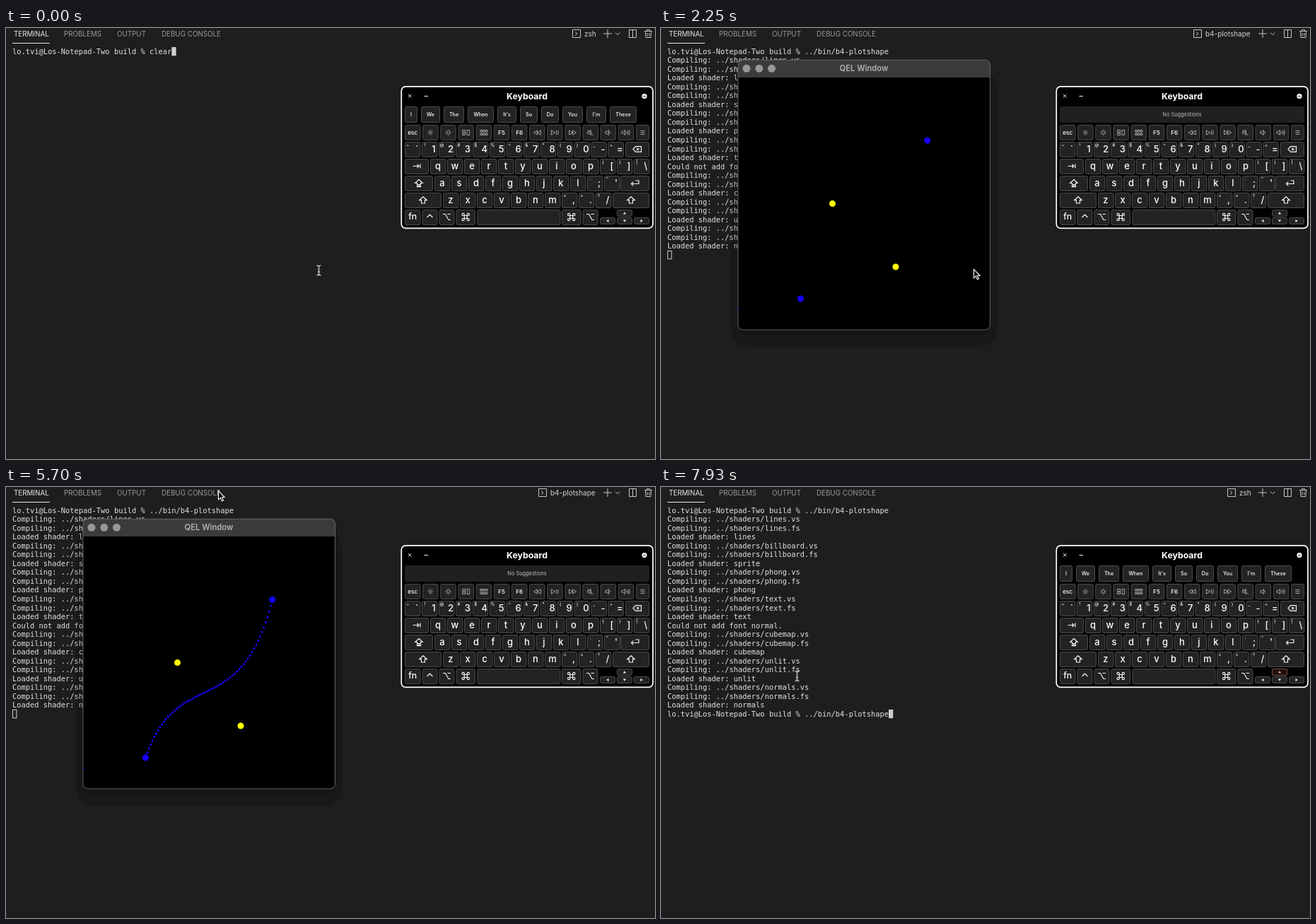
These frames come from a looping animation (918x610 px, 8 s). An HTML page:

```html
<!DOCTYPE html>
<html lang="en">
<head>
<meta charset="utf-8">
<title>Curve demo</title>
<style>
html, body { margin: 0; width: 100%; height: 100%; overflow: hidden; background: #1e1e1e; }
svg { display: block; width: 918px; height: 610px; font-family: Inter, "Open Sans", sans-serif; }
.mono { font: 10.4px "DejaVu Sans Mono", "Liberation Mono", monospace; fill: #e2e2e2; }
.tab { font-size: 9.8px; fill: #989898; }
.tab.active { fill: #e7e7e7; }
.label { font-size: 10px; fill: #d0d0d0; }
.tool { fill: none; stroke: #c5c5c5; }
.key { fill: #232323; stroke: #4c4c4c; }
.cap { fill: #fff; font-weight: 500; text-anchor: middle; }
.icon { fill: none; stroke: #f4f4f4; stroke-width: 1.2; }
.thin { stroke: #c4c4c4; stroke-width: .8; }
.solid { fill: #e8e8e8; stroke: none; }
.block { fill: #cfcfcf; }
</style>
</head>
<body>
<svg id="stage" viewBox="0 0 918 610">
  <g id="panel">
    <text class="tab active" x="11" y="11.6">TERMINAL</text>
    <text class="tab" x="82" y="11.6">PROBLEMS</text>
    <text class="tab" x="157" y="11.6">OUTPUT</text>
    <text class="tab" x="220" y="11.6">DEBUG CONSOLE</text>
    <path d="M9 21.5H62" stroke="#e7e7e7"/>
    <g id="shellTab">
      <path class="tool" d="M801.5 2.5h11v11h-11zM805 5.5l3 2.5l-3 2.5"/>
      <text class="label" x="818" y="11.8">zsh</text>
    </g>
    <g id="appTab">
      <path class="tool" d="M753.5 2.5h11v11h-11zM757 5.5l3 2.5l-3 2.5"/>
      <text class="label" x="770" y="11.8">b4-plotshape</text>
    </g>
    <path class="tool" d="M845 8H857M851 2V14M862 6.5l3.2 3.2l3.2-3.2M881.5 2.5h10v11h-10zM886.5 2.5v11"/>
    <path class="tool" d="M903 4.5h11M906.5 4.5v-2h4v2M904.5 4.5l.5 9h7l.5-9M907 7v4.5M910 7v4.5"/>
  </g>

  <g id="term" class="mono"></g>

  <g id="win">
    <rect id="shadow" x="99" y="58" width="376" height="394" rx="26" fill="#000" fill-opacity=".17"/>
    <rect x="109" y="60" width="356" height="374" rx="14" fill="#000" opacity=".17"/>
    <rect x="109" y="45" width="357" height="382" rx="7" fill="#3b3b3b"/>
    <path d="M109 70H466V420a7 7 0 0 1-7 7H116a7 7 0 0 1-7-7Z" fill="#000"/>
    <rect x="109" y="45.3" width="356.5" height="381.8" rx="7" fill="none" stroke="#6c6c6c" stroke-width=".9"/>
    <g fill="#979797">
      <circle cx="121" cy="57.3" r="5.5"/>
      <circle cx="138.8" cy="57.3" r="5.5"/>
      <circle cx="156.5" cy="57.3" r="5.5"/>
    </g>
    <g id="hover" fill="none" stroke="#2a2a2a" stroke-width="1.3">
      <path d="M118.5 54.8l5 5m0-5l-5 5M135.7 57.3h6.2"/>
      <circle cx="156.5" cy="57.3" r="3"/>
      <path d="M154.5 59.3l4-4"/>
    </g>
    <text x="287" y="61.2" font-size="11.2" font-weight="600" fill="#b2b2b2" text-anchor="middle">QEL Window</text>
    <rect id="dim" x="110" y="46" width="355" height="23" rx="6" fill="#383838" fill-opacity=".55"/>
    <rect x="108.8" y="397" width="1.2" height="2" fill="#1500ff"/>
    <g id="curve" fill="#1500ff"></g>
    <g id="dots"></g>
  </g>

  <g id="board">
    <rect x="559.3" y="82.8" width="355.7" height="200.6" rx="6" fill="#000" stroke="#fff" stroke-width="1.7"/>
    <path class="icon" d="M569 94l4.4 4.4m0-4.400l-4.400 4.4M591.5 96.5h5.5" style="stroke-width:1"/>
    <text class="cap" x="737" y="101.3" font-size="12.3" style="font-weight:700">Keyboard</text>
    <circle cx="903" cy="96.5" r="3.600" fill="#fff"/>
    <path d="M901.2 96.5h3.6" stroke="#222"/>
    <g id="words"></g>
    <g id="noWords">
      <rect x="564" y="111" width="346" height="23" rx="2" fill="#202020"/>
      <text x="737" y="125.2" font-size="7.4" fill="#b8b8b8" text-anchor="middle">No Suggestions</text>
    </g>
    <g id="keys"></g>
    <g id="sKey">
      <rect x="630.8" y="209.3" width="21" height="21" rx="2.5" fill="#4b4b4b" stroke="#eee" stroke-width="1.4"/>
      <text class="cap" x="641" y="223.8" font-size="13">s</text>
    </g>
    <g id="upKey">
      <rect x="864.5" y="257.5" width="21" height="9" rx="1.5" fill="#1c1111" stroke="#8a4a48"/>
      <path d="M872.8 263.2h4.400l-2.200-3.200z" fill="#e59a94"/>
    </g>
  </g>

  <path id="arrow" d="M.5 .5V12.800L3.400 10.200L5.400 14.800L7.500 13.900L5.500 9.500H9.200Z" fill="#000" stroke="#fff" stroke-width="1.100"/>
  <path id="beam" d="M-3-7Q0-7 0-5Q0-7 3-7M0-5V5M-3 7Q0 7 0 5Q0 7 3 7M-1.500 2H1.500" fill="none" stroke="#eee" stroke-width="1.200"/>
</svg>

<script>
const LOOP = 8000, CHAR = 6.261, LINE = 12.52;
const get = id => document.getElementById(id);

function add(parent, tag, attrs, text) {
  const node = document.createElementNS('http://www.w3.org/2000/svg', tag);
  for (const k in attrs) node.setAttribute(k, attrs[k]);
  if (text) node.textContent = text;
  return parent.appendChild(node);
}

// Terminal
const term = get('term');
const prompt = 'lo.tvi@Los-Notepad-Two build %', run = '../bin/b4-plotshape';
const group = (id, parent = term) => add(parent, 'g', { id });
const write = (g, row, col, text) =>
  add(g, 'text', { x: 9 + col * CHAR, y: 36.8 + row * LINE }, text);
const block = (id, row, col) =>
  add(term, 'rect', { id, class: 'block', x: 9 + col * CHAR, y: 27 + row * LINE, width: 6.2, height: 12.3 });

write(term, 0, 0, prompt);
write(group('clear'), 0, 31, 'clear');
write(group('run1'), 0, 31, run);
const out = group('out');
let row = 1;
for (const name of ['lines', 'billboard', 'phong', 'text', 'cubemap', 'unlit', 'normals']) {
  for (const ext of ['vs', 'fs']) write(out, row++, 0, `Compiling: ../shaders/${name}.${ext}`);
  write(out, row++, 0, 'Loaded shader: ' + (name === 'billboard' ? 'sprite' : name));
  if (name === 'text') write(out, row++, 0, 'Could not add font normal.');
}
write(group('prompt2'), row, 0, prompt);
write(group('run2'), row, 31, run);
block('curClear', 0, 36);
block('curRun1', 0, 50);
block('curWait', 1, 0);
block('curPrompt', row, 31);
block('curRun2', row, 50);
add(term, 'rect', { id: 'curIdle', x: 9.5, y: 27.5 + row * LINE, width: 5.4, height: 11.4, fill: 'none', stroke: '#cfcfcf' });

// Cubic curve through its control points
const ctrl = [[197.5, 383], [242.5, 248.6], [332, 338], [376.8, 159.3]];
ctrl.forEach(([cx, cy], i) =>
  add(get('dots'), 'circle', { cx, cy, r: 4.5, fill: i % 3 ? '#ffff00' : '#1500ff' }));
const STEPS = 60;
for (let i = 0; i <= STEPS; i++) {
  const u = i / STEPS, v = 1 - u;
  const at = k => v ** 3 * ctrl[0][k] + 3 * v * v * u * ctrl[1][k] + 3 * v * u * u * ctrl[2][k] + u ** 3 * ctrl[3][k];
  add(get('curve'), 'circle', { cx: at(0), cy: at(1), r: 1.5 });
}

// Keyboard
const keys = get('keys');
const rect = (x, y, w, h = 22, g = keys) =>
  add(g, 'rect', { class: 'key', x: x + .5, y: y + .5, width: w - 1, height: h - 1, rx: 2 });
const cap = (x, y, text, size, g = keys) =>
  add(g, 'text', { class: 'cap', x, y, 'font-size': size }, text);
const icon = (x, y, d, type = '') =>
  add(keys, 'path', { class: 'icon ' + type, transform: `translate(${x} ${y})`, d });
const iconKey = (x, y, w, d) => { rect(x, y, w); icon(x + w / 2, y + 10.5, d); };
const letters = (x, y, text) => [...text].forEach((c, i) => {
  rect(x + 24 * i, y, 22.5);
  cap(x + 11 + 24 * i, y + 14.8, c, 13);
});
const pairs = (x, y, text) => text.split(' ').forEach(([sup, main], i) => {
  const left = x + 23.95 * i;
  rect(left, y, 22.5);
  cap(left + 4.5, y + 7, sup, 6);
  cap(left + 17, y + 14.8, main, 13);
});

const words = [['I', 564, 18], ['We', 587, 27], ['The', 619, 29], ['When', 653, 37], ["It's", 695, 27],
  ['So', 727, 25], ['Do', 757, 25], ['You', 787, 29], ["I'm", 821, 28], ['These', 854, 38]];
for (const [word, x, w] of words) {
  rect(x, 111, w, 23, get('words'));
  cap(x + w / 2, 125.2, word, 7.2, get('words'));
}

const sun = r => {
  let d = `M${-r} 0a${r} ${r} 0 1 0 ${2 * r} 0a${r} ${r} 0 1 0 ${-2 * r} 0`;
  for (let i = 0; i < 8; i++) {
    const c = Math.cos(i * Math.PI / 4), s = Math.sin(i * Math.PI / 4);
    d += `M${c * (r + 1.3)} ${s * (r + 1.3)}L${c * (r + 2.3)} ${s * (r + 2.3)}`;
  }
  return d;
};
const grid = [-5, -1.2, 2.6].map(x => `M${x}-3.5h2.5v2.5h-2.5zM${x} 1h2.5v2.5h-2.5z`).join('');
const speaker = 'M-4-1.3H-2L.5-3.5V3.5L-2 1.3H-4Z';
const media = [null, sun(1.7), sun(2.2),
  'M-5-3.5h4v3h-4zM-5 1h4v2.5h-4zM1.5-3.5h3.5v7h-3.5z', grid, null, null,
  'M0-3L-5 0L0 3ZM5-3L0 0L5 3Z', 'M-5-3.2L0 0L-5 3.2ZM2-3.2V3.2M4.5-3.2V3.2', 'M0-3L5 0L0 3ZM-5-3L0 0L-5 3Z',
  speaker + 'M-4-4L4 4', speaker + 'M2-1.5Q3 0 2 1.5',
  'M-6-1.3H-4L-1.5-3.5V3.5L-4 1.3H-6ZM.5-1.5Q1.5 0 .5 1.5M2.2-2.7Q4 0 2.2 2.7M4-3.8Q6.5 0 4 3.8',
  'M-3-2.5H3M-3 0H3M-3 2.5H3'];
const names = { 0: 'esc', 5: 'F5', 6: 'F6' };
media.forEach((d, i) => {
  const x = 564 + 25.15 * i, w = i === 13 ? 19 : 22.5;
  rect(x, 137, w);
  if (d) icon(x + w / 2, 148, d, 'thin');
  else cap(x + w / 2, 151, names[i], 8.2);
});

const shift = 'M0-4.8L5.3 .2H2.5V4.5H-2.5V.2H-5.3Z';
const option = 'M-5.5-4H-2L2.5 4H5.5M1-4H5.5';
const command = 'M-2-2H2V2H-2ZM-2-2H-3.6A1.6 1.6 0 1 1-2-3.6ZM2-2H3.6A1.6 1.6 0 1 0 2-3.6Z' +
  'M-2 2H-3.6A1.6 1.6 0 1 0-2 3.6ZM2 2H3.6A1.6 1.6 0 1 1 2 3.6Z';

pairs(564, 161, '~` !1 @2 #3 $4 %5 ^6 &7 *8 (9 )0 _- +=');
iconKey(876, 161, 34, 'M-6 0L-2.5-3.8H5.5V3.8H-2.5ZM-1-1.6L2.4 1.6M2.4-1.6L-1 1.6');
iconKey(564, 185, 34, 'M-5.5 0H3M.5-2.5L3 0L.5 2.5M5-3V3');
letters(600, 185, 'qwertyuiop');
pairs(840, 185, '{[ }] |\\');
iconKey(564, 209, 40, 'M0-5L5.3 0H2.5V2H-2.5V0H-5.3ZM-2.5 3.7H2.5V5.2H-2.5Z');
letters(606, 209, 'asdfghjkl');
pairs(822, 209, ':; "\'');
iconKey(869, 209, 41, 'M1-3.5H5.5V1H-5M-2.2-1.8L-5 1L-2.2 3.8');
iconKey(564, 233, 52, shift);
letters(618, 233, 'zxcvbnm');
pairs(786, 233, '<, >. ?/');
iconKey(858, 233, 52, shift);
rect(564, 257, 22.5);
cap(575.2, 271.3, 'fn', 12.3);
iconKey(588.5, 257, 22, 'M-4 .5L0-3.3L4 .5');
iconKey(612.5, 257, 22, option);
iconKey(636.5, 257, 27.5, command);
rect(666.5, 257, 118);
iconKey(786, 257, 27.5, command);
iconKey(815.5, 257, 22, option);
for (const [x, y, turn] of [[864, 257, 0], [840, 268, -90], [864, 268, 180], [888, 268, 90]]) {
  rect(x, y, 22, 10);
  add(keys, 'path', { class: 'solid', d: 'M-2.2 1.5H2.2L0-1.7Z', transform: `translate(${x + 11} ${y + 5}) rotate(${turn})` });
}

// Timing: every change is a hard step
function track(id, prop, steps) {
  get(id).animate(
    steps.map(([ms, value]) => ({ offset: ms / LOOP, [prop]: value, easing: 'step-end' })),
    { duration: LOOP, iterations: Infinity });
}
// Times alternate between appearing and vanishing
function on(id, ...times) {
  const steps = times[0] ? [[0, 0]] : [];
  times.forEach((ms, i) => steps.push([ms, 1 - i % 2]));
  track(id, 'opacity', steps);
}
const move = (id, points) =>
  track(id, 'transform', points.map(([ms, x, y]) => [ms, `translate(${x}px, ${y}px)`]));

on('clear', 0, 450);
on('curClear', 0, 450);
on('run1', 450);
on('curRun1', 450, 1500);
on('curWait', 1500, 1800);
on('out', 1800);
on('curIdle', 1800, 7180);
on('prompt2', 7180);
on('curPrompt', 7180, 7930);
on('run2', 7930);
on('curRun2', 7930);
on('shellTab', 0, 1650, 7180);
on('appTab', 1650, 7180);
on('win', 1800, 7030);
on('dim', 1800, 1950);
on('shadow', 1950);
on('curve', 3750);
on('hover', 6140);
on('words', 0, 2250, 7330);
on('noWords', 2250, 7330);
on('sKey', 3150, 5100);
on('upKey', 450, 600, 7930);
on('arrow', 1650, 7030);
on('beam', 0, 1650, 7030);
move('arrow', [[0, 442, 341], [2850, 505, 300], [3000, 600, 232], [3150, 636, 211], [4950, 645.5, 216],
  [5100, 690, 150], [5250, 717, 95], [5400, 640, 40], [5550, 480, 12], [5690, 300, 5], [5840, 160, 20],
  [5990, 102, 48], [6140, 112, 53], [6290, 118, 56], [6440, 120, 56.5]]);
move('beam', [[0, 442.5, 343], [7030, 150, 150], [7180, 179, 235], [7330, 192.5, 267.5]]);
</script>
</body>
</html>
```
